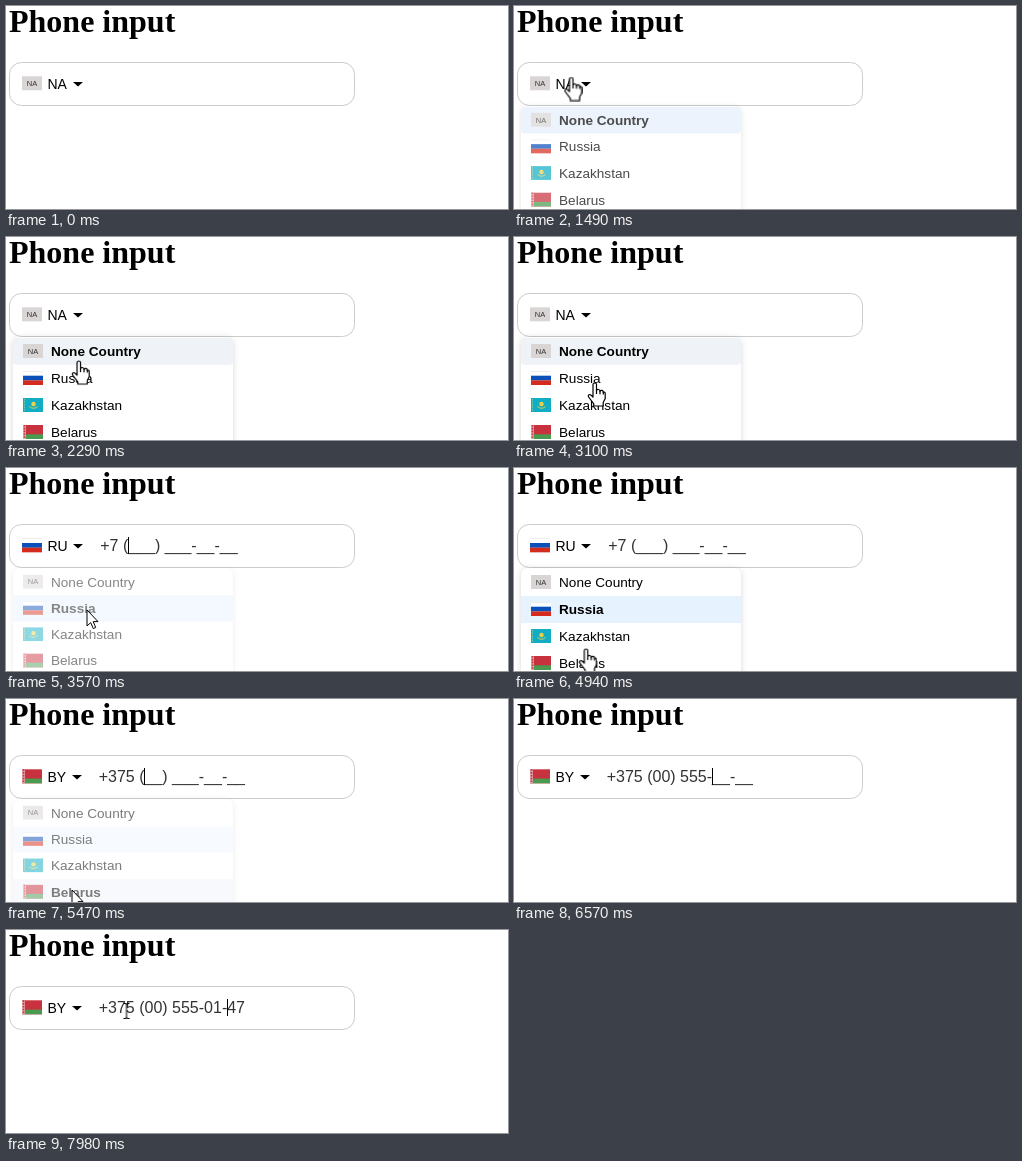
Animation, 502 px wide and 203 px high, one loop 8 s. Source, as an HTML page:

```html
<!DOCTYPE html>
<html lang="en">
<head>
<meta charset="utf-8">
<title>Phone input</title>
<style>
  html, body { margin: 0; width: 100%; height: 100%; overflow: hidden; background: #fff; }
  svg { display: block; font-family: "Liberation Sans", Arial, sans-serif; }
  h1, .title { font: bold 32px "Liberation Serif", "Times New Roman", serif; }
  .label { font-size: 14px; }
  .value { font-size: 16px; fill: #333; }
  .item text { font-size: 13.6px; }
  .item.on text { font-weight: bold; }
  .na { font-size: 7.5px; fill: #333; text-anchor: middle; }
  #panel { filter: drop-shadow(0 1px 3px rgba(0, 0, 0, .16)); }

  #menu { transform-origin: 0 100px; animation: menu 8s infinite; }
  @keyframes menu {
    0%, 16.875% { opacity: 0; transform: scaleY(.95); animation-timing-function: ease-out; }
    20.25%, 42.875% { opacity: 1; transform: none; animation-timing-function: linear; }
    46.25%, 53.25% { opacity: 0; transform: scaleY(.95); animation-timing-function: ease-out; }
    56.625%, 66.75% { opacity: 1; transform: none; animation-timing-function: linear; }
    70.125%, 100% { opacity: 0; transform: scaleY(.95); }
  }

  #pointer { animation: move 8s infinite ease-in-out; }
  @keyframes move {
    0%, 11.25% { transform: translate(90px, 215px); }
    14.75% { transform: translate(62px, 61px); }
    16.625%, 25.25% { transform: translate(57.5px, 71.5px); animation-timing-function: linear; }
    28.625% { transform: translate(73px, 124px); animation-timing-function: ease-out; }
    31.25%, 36.25% { transform: translate(78px, 135.5px); }
    37.9% { transform: translate(81px, 150px); }
    39.625%, 45.5% { transform: translate(81px, 142px); }
    52.375%, 56.5% { transform: translate(55px, 84.5px); }
    62.625%, 63.25% { transform: translate(73px, 185px); }
    65%, 68.75% { transform: translate(66px, 191px); }
    72.5%, 84.74% { transform: translate(74px, 225px); animation-timing-function: step-end; }
    84.75% { transform: translate(113px, 96px); animation-timing-function: ease-out; }
    88.9% { transform: translate(120px, 82px); }
    90.625%, 100% { transform: translate(120.5px, 81px); }
  }
</style>
</head>
<body>
<svg width="502" height="203" viewBox="0 0 502 203">
  <defs>
    <g id="NA">
      <rect width="20" height="14" fill="#d9d5d5"/>
      <text class="na" x="10" y="9.8">NA</text>
    </g>
    <g id="RU">
      <rect width="20" height="14" fill="#e4e4e6"/>
      <rect y=".7" width="20" height="4.3" fill="#fff"/>
      <rect y="4.7" width="20" height="4.7" fill="#0b4fb8"/>
      <rect y="9.4" width="20" height="4.6" fill="#d52b1e"/>
    </g>
    <g id="KZ">
      <rect width="20" height="14" fill="#12adc4"/>
      <circle cx="10.5" cy="6" r="2.2" fill="#e9d24a"/>
      <path d="M6.5 8.5Q10.5 12 14.5 8.5" fill="none" stroke="#d8cf55"/>
      <path d="M1.5 1V13" stroke="#7cc9a0" stroke-dasharray="1.5 1"/>
    </g>
    <g id="BY">
      <rect width="20" height="14" fill="#c8313e"/>
      <rect y="9.3" width="20" height="4.7" fill="#4a9a50"/>
      <rect width="3" height="14" fill="#dfa3a6"/>
      <path d="M1.5 0V14" stroke="#c8313e" stroke-width="1.6" stroke-dasharray="1.6 1.2"/>
    </g>
  </defs>

  <text class="title" x="3" y="26">Phone input</text>
  <rect x="3.5" y="56.5" width="345" height="43" rx="12" fill="#fff" stroke="#ccc"/>
  <use id="flag" href="#NA" x="16" y="70.3"/>
  <text id="code" class="label" x="41.5" y="83">NA</text>
  <path id="arrow" d="M0 76H10L5 80.5Z"/>
  <text id="value" class="value" y="83"></text>
  <rect id="caret" y="69" width="1" height="17"/>

  <g id="menu">
    <rect id="panel" x="7" y="100" width="220" height="140" rx="7" fill="#fff"/>
  </g>

  <g id="pointer" stroke="#000" fill="#fff" stroke-linejoin="round">
    <path id="select" d="M0 0V16L3.7 12.6 6.3 18.6 8.7 17.5 6.2 11.6H11Z"/>
    <g id="hand" stroke-width="1.2">
      <path d="M-2 1.6Q-2 0 -.3 0Q1.5 0 1.5 1.6V7.6Q2 6.3 3.4 6.5Q5 6.7 5 8.2Q5.7 7 7 7.4Q8.3 7.8 8.3 9.2Q10.2 8.6 10.2 10.8V15.5L8.2 19.5V23H-1.2V20.8L-6 14.5Q-7.4 12.6 -6 11.8Q-4.5 11.2 -3 13L-2 14Z"/>
      <path d="M1.5 7.5V11M5 8V11.3M8.3 9V11.6" fill="none"/>
    </g>
    <path id="beam" fill="none" d="M-3 -7.5H-1Q0 -7.5 0 -6.5Q0 -7.5 1 -7.5H3M0 -7V7M-3 7.5H-1Q0 7.5 0 6.5Q0 7.5 1 7.5H3"/>
  </g>
</svg>
<script>
  const LOOP = 8000, DIGITS = '005550147';
  const SHAPES = ['select', 'hand', 'beam'];
  const MASKS = { NA: '', RU: '+7 (___) ___-__-__', BY: '+375 (__) ___-__-__' };
  const COUNTRIES = [['NA', 'None Country'], ['RU', 'Russia'], ['KZ', 'Kazakhstan'], ['BY', 'Belarus']];
  const $ = id => document.getElementById(id);

  // Each entry changes part of the state from its time on.
  const EVENTS = [
    [0, { code: 'NA', typed: 0, caret: 0, shape: 'select', fills: ['#e4eefc'] }],
    [1090, { shape: 'hand' }],
    [1620, { fills: ['#eff3f8'] }],
    [3430, { code: 'RU', caret: 4, shape: 'select', fills: ['', '#e6f2fe'] }],
    [3940, { caret: 0 }],
    [4020, { shape: 'hand' }],
    [5340, { code: 'BY', caret: 6, shape: 'select', fills: ['', '#f0f8ff', '', '#eff4fa'] }],
    [5970, { caret: 0 }],
    [6170, { typed: 2, caret: 10 }],
    [6310, { typed: 3, caret: 11 }],
    [6570, { typed: 5, caret: 14 }],
    [6640, { typed: 6, caret: 15 }],
    [6780, { typed: 7, caret: 17 }],
    [6850, { shape: 'beam' }],
    [6910, { typed: 8, caret: 18 }],
    [7040, { typed: 9, caret: 19 }],
    [7780, { caret: 18 }],
    [7980, { caret: 17 }]
  ];

  const items = COUNTRIES.map(([code, name], i) => {
    const g = document.createElementNS('http://www.w3.org/2000/svg', 'g');
    const y = 101 + 27 * i;
    g.setAttribute('class', 'item');
    g.innerHTML = `<rect x="7" y="${y}" width="220" height="27" rx="${i ? 0 : 4}"/>
      <use href="#${code}" x="17" y="${y + 6}"/><text x="45" y="${y + 18}">${name}</text>`;
    $('menu').append(g);
    return g;
  });

  function draw(s) {
    const isBY = s.code === 'BY', x = isBY ? 92.7 : 94.2;
    let n = 0;
    const text = MASKS[s.code].replace(/_/g, c => n < s.typed ? DIGITS[n++] : c);
    $('flag').setAttribute('href', '#' + s.code);
    $('code').textContent = s.code;
    $('arrow').setAttribute('transform', `translate(${isBY ? 66 : 67} 0)`);
    $('value').textContent = text;
    $('value').setAttribute('x', x);
    $('caret').style.display = s.caret ? '' : 'none';
    if (s.caret) $('caret').setAttribute('x', Math.floor(x + $('value').getSubStringLength(0, s.caret)));
    SHAPES.forEach(id => $(id).style.display = id === s.shape ? '' : 'none');
    items.forEach((g, i) => {
      g.classList.toggle('on', COUNTRIES[i][0] === s.code);
      g.firstChild.setAttribute('fill', s.fills[i] || 'none');
    });
  }

  let start, last;
  function tick(now) {
    start ??= now;
    const t = (now - start) % LOOP;
    const past = EVENTS.filter(([at]) => at <= t);
    if (past.length !== last) {
      last = past.length;
      draw(Object.assign({}, ...past.map(e => e[1])));
    }
    requestAnimationFrame(tick);
  }
  draw(EVENTS[0][1]);
  requestAnimationFrame(tick);
</script>
</body>
</html>
```
